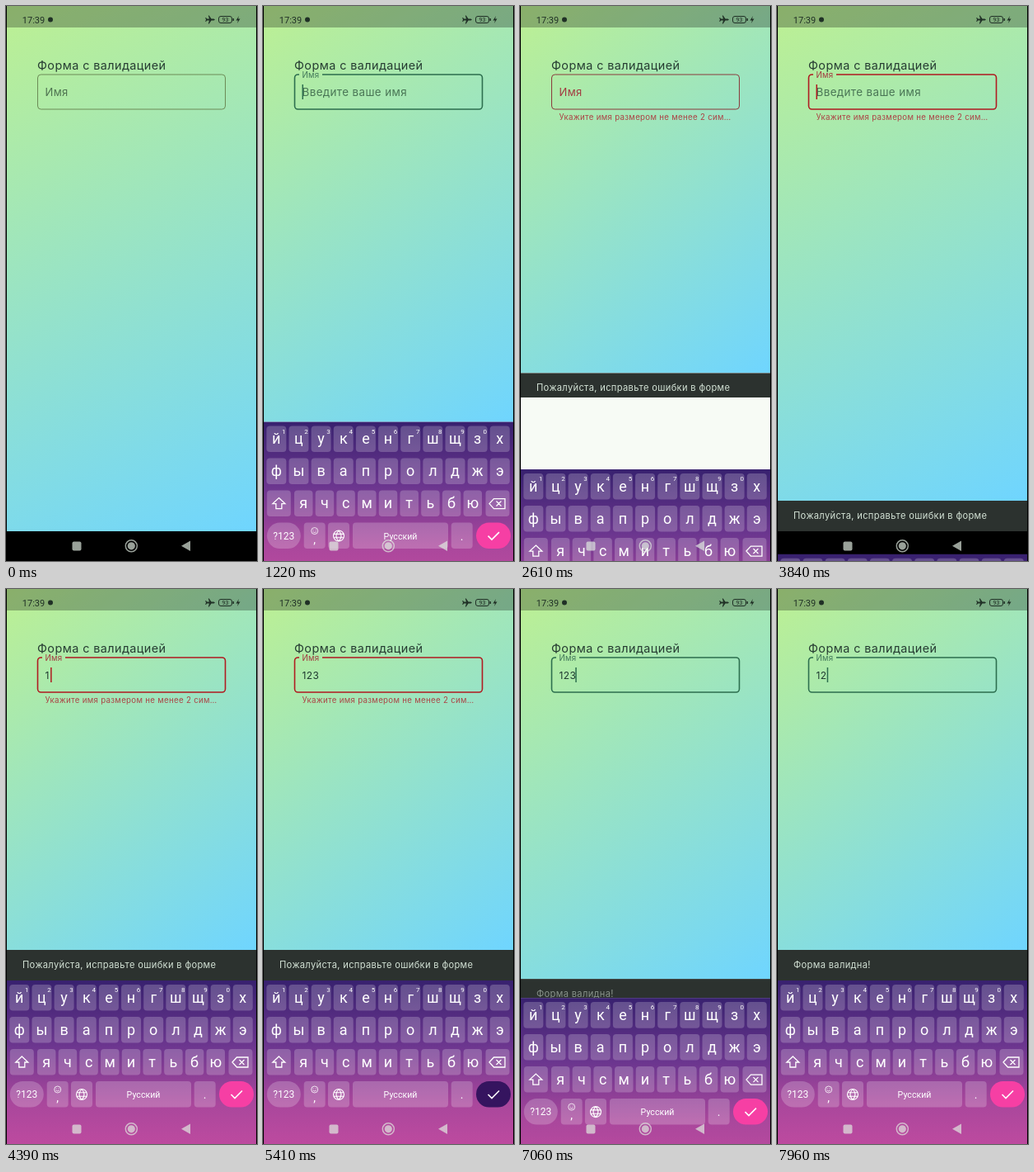
Write an HTML page with a canvas that moves like this. It is 305 px wide and 672 px high and loops after 8000 ms.

```html
<!DOCTYPE html>
<html lang="ru">
<head>
<meta charset="utf-8">
<style>
html, body { margin: 0; width: 100%; height: 100%; overflow: hidden; background: #000; }
canvas { display: block; }
</style>
</head>
<body>
<canvas id="stage" width="305" height="672"></canvas>
<script>
const ctx = document.getElementById('stage').getContext('2d');
const LOOP = 8000, W = 305, H = 672, NAV = 636, KEYS_TOP = 474, SNACK = 37;
const FORM = 'Inter, "Open Sans", sans-serif', SYSTEM = 'Roboto, sans-serif';

const clamp = v => Math.max(0, Math.min(1, v));
const mix = (a, b, p) => a + (b - a) * p;
const ramp = (t, start, len) => clamp((t - start) / len);

// cubic-bezier(.4, 0, .2, 1)
function ease(x) {
  let lo = 0, hi = 1;
  for (let i = 0; i < 20; i++) {
    const u = (lo + hi) / 2, v = 1 - u;
    if (1.2 * v * v * u + .6 * v * u * u + u ** 3 < x) lo = u; else hi = u;
  }
  return 3 * lo * lo - 2 * lo ** 3;
}
const move = (t, start, len) => ease(ramp(t, start, len));

// Timeline
const FOCUS = [[735, 2430], [3490, 5695], [6560, LOOP]];
const SHOW = [1050, 3804, 6874];
const HIDE = [2513, 5713];
const EDITS = [[4390, '1'], [4590, '12'], [4850, '123'], [7890, '12']];
const PRESSES = [[2200, 2400], [5400, 5600]];

// 1 while inside an interval, with a ramp at both ends
const within = (t, spans, lag, len) =>
  spans.reduce((s, [a, b]) => s + ramp(t, a + lag, len) - ramp(t, b, len), 0);

function sceneAt(t) {
  const up = SHOW.reduce((s, a) => s + move(t, a, 300), 0);
  const down = HIDE.reduce((s, a) => s + move(t, a, 300), 0);
  const keysTop = mix(H, KEYS_TOP, up - down);
  // the page keeps its size for a moment while the keyboard leaves
  const held = HIDE.some(a => t >= a && t < a + 145);
  const leaving = HIDE.some(a => t >= a + 145 && t < a + 300);
  const body = held ? KEYS_TOP : leaving ? NAV : Math.min(NAV, keysTop);
  const snack = move(t, 2480, 250) - move(t, 6700, 250) + move(t, 6960, 250);
  const edit = EDITS.filter(e => e[0] <= t).pop();
  const span = FOCUS.find(([a, b]) => t >= a && t < b);
  const blinkFrom = span && Math.max(span[0] + 80, edit ? edit[0] : 0);
  return {
    keysTop, body, snack,
    text: edit ? edit[1] : '',
    focused: !!span,
    cursor: span && Math.floor((t - blinkFrom) / 500) % 2 < 1,
    border: within(t, FOCUS, 40, 140),
    float: ease(clamp(within(t, [[735, 2430], [3490, LOOP]], 0, 165))),
    error: within(t, [[2420, 5695]], 0, 150),
    message: t < 6955 ? 'Пожалуйста, исправьте ошибки в форме' : 'Форма валидна!',
    pressed: PRESSES.some(([a, b]) => t >= a && t < b)
  };
}

// Drawing helpers
function rect(x, y, w, h, fill) {
  ctx.fillStyle = fill;
  ctx.fillRect(x, y, w, h);
}
function round(x, y, w, h, r, fill) {
  ctx.beginPath();
  ctx.roundRect(x, y, w, h, r);
  ctx.fillStyle = fill;
  ctx.fill();
}
function disc(x, y, r, fill) {
  ctx.beginPath();
  ctx.arc(x, y, r, 0, 7);
  ctx.fillStyle = fill;
  ctx.fill();
}
function line(d, x, y, color, width = 1.3) {
  ctx.save();
  ctx.translate(x, y);
  ctx.strokeStyle = color;
  ctx.lineWidth = width;
  ctx.stroke(new Path2D(d));
  ctx.restore();
}
function formText(s, x, y, size, fill) {
  ctx.font = size + 'px ' + FORM;
  ctx.letterSpacing = size * .03 + 'px';
  ctx.textAlign = 'left';
  ctx.fillStyle = fill;
  ctx.fillText(s, x, y);
  ctx.letterSpacing = '0px';
}
function keyText(s, x, y, size, fill = '#fff') {
  ctx.font = size + 'px ' + SYSTEM;
  ctx.textAlign = 'center';
  ctx.fillStyle = fill;
  ctx.fillText(s, x, y);
}

function drawStatus() {
  rect(0, 0, W, 26, 'rgba(0,0,0,.27)');
  const ink = '#203026';
  keyText('17:39', 33.5, 20.5, 11, ink);
  disc(54, 16.5, 3, ink);
  ctx.fill(new Path2D('M254 16.5L252.5 15.6H249.5L246.8 11.5H245.8L247 15.6H244.2L243 14H242.2L243 16.5' +
    'L242.2 19H243L244.2 17.4H247L245.8 21.5H246.8L249.5 17.4H252.5Z'));
  ctx.beginPath();
  ctx.roundRect(258.5, 12.5, 16, 8, 2.5);
  ctx.strokeStyle = ink;
  ctx.lineWidth = 1;
  ctx.stroke();
  rect(275.5, 15, 1.5, 3, ink);
  keyText('93', 266.5, 19.2, 7, ink);
  ctx.fill(new Path2D('M283 12L279.5 17.5H282L281 21L284.5 15.5H282Z'));
}

function drawField(s) {
  formText('Форма с валидацией', 38, 77, 14.4, '#263c32');
  const bad = s.error > .5;
  const edge = bad ? (s.focused ? '#b01a20' : '#8a3a3c') : s.focused ? '#2c6e4e' : '#6c8b56';
  const label = bad ? '#a23a40' : s.focused ? '#42785a' : '#4e7250';

  ctx.save();
  ctx.beginPath();
  ctx.rect(30, 70, 245, 65);
  if (s.float > 0) ctx.rect(58 - 14 * s.float, 78, 28 * s.float, 10);
  ctx.clip('evenodd');
  ctx.beginPath();
  ctx.roundRect(38.5, 83, 228, 42, 4);
  ctx.strokeStyle = edge;
  ctx.lineWidth = 1 + .6 * s.border;
  ctx.stroke();
  ctx.restore();

  formText('Имя', 47.5, mix(109, 87, s.float), mix(13, 9.7, s.float), label);
  if (s.text) {
    formText(s.text, 47.5, 109, 12, '#1f3a30');
  } else {
    ctx.globalAlpha = s.focused ? s.float : 0;
    formText('Введите ваше имя', 47.5, 109, 13.4, '#4a7656');
    ctx.globalAlpha = 1;
  }
  if (s.cursor) {
    const x = s.text ? 47.5 + 6.6 * s.text.length : 47.5;
    rect(x, 95, 1.5, 18, bad ? '#b01a20' : '#2c6e4e');
  }
  ctx.globalAlpha = s.error;
  formText('Укажите имя размером не менее 2 сим…', 47.5, 138, 9.73, '#ac4446');
  ctx.globalAlpha = 1;
}

function drawPage(s) {
  const end = s.body - SNACK * s.snack;
  // corner-to-corner shading of the current page height
  const g = ctx.createLinearGradient(0, 0, W, end);
  g.addColorStop(0, '#bdf092');
  g.addColorStop(1, '#6fd5ff');
  rect(0, 0, W, NAV, '#f7fbf5');
  rect(0, 0, W, end, g);
  drawStatus();
  drawField(s);
  if (s.snack > 0) {
    ctx.save();
    ctx.beginPath();
    ctx.rect(0, end, W, s.body - end);
    ctx.clip();
    rect(0, end, W, SNACK, '#2c322f');
    ctx.globalAlpha = clamp((s.snack - .4) / .4);
    formText(s.message, 20, end + 22, 11.15, '#d3e2d5');
    ctx.restore();
  }
}

function drawKeys(top, pressed) {
  const g = ctx.createLinearGradient(0, top, 0, top + 198);
  g.addColorStop(0, '#38216f');
  g.addColorStop(.4, '#6c368f');
  g.addColorStop(.75, '#a9479c');
  g.addColorStop(1, '#bd4a9f');
  rect(0, top, W, 200, g);

  const key = (x, y, w, r = 4) => round(x - w / 2, top + y, w, 31.5, r, 'rgba(255,255,255,.21)');
  const row = (letters, x0, step, y, w) => [...letters].forEach((c, i) => {
    key(x0 + i * step, y, w);
    keyText(c, x0 + i * step, top + y + 21.5, 18);
  });
  row('йцукенгшщзх', 16.3, 27.15, 5, 24);
  [...'1234567890'].forEach((c, i) => keyText(c, 25.3 + i * 27.15, top + 14, 8));
  row('фывапролджэ', 16.3, 27.15, 44, 24);
  row('ячсмитьбю', 49.2, 25.7, 83, 22.5);

  key(19.3, 83, 29);
  line('M0 -7L7.5 0H3.5V6H-3.5V0H-7.5Z', 19.3, top + 99, '#fff');
  key(285, 83, 29);
  line('M-10 0L-4.5 -6H9V6H-4.5ZM-1.5 -3L4.5 3M4.5 -3L-1.5 3', 285, top + 99, '#fff');

  key(25.3, 122, 41, 15.7);
  keyText('?123', 25.3, top + 142, 12);
  key(62.7, 122, 26);
  line('M4 0A4 4 0 1 1 -4 0A4 4 0 1 1 4 0M-2 1Q0 3 2 1M-1.5 -1.5V-.6M1.5 -1.5V-.6',
    62.7, top + 132, '#fff', .8);
  keyText(',', 62.7, top + 147, 14);
  key(92, 122, 26);
  line('M6.5 0A6.5 6.5 0 1 1 -6.5 0A6.5 6.5 0 1 1 6.5 0M0 -6.5Q-6 0 0 6.5Q6 0 0 -6.5M-6 -2.2H6M-6 2.2H6',
    92, top + 138, '#fff', 1.1);
  key(167, 122, 116);
  keyText('Русский', 167, top + 142, 10.6);
  key(241.7, 122, 26);
  keyText('.', 241.7, top + 143, 14);
  round(259, top + 122, 42, 31.5, 15.7, pressed ? '#35145f' : '#f63fa4');
  line('M-6.5 0L-2 4.5L7 -4.5', 280, top + 138, '#fff', 1.6);
}

function drawNav() {
  const ink = 'rgba(225,238,225,.68)';
  round(80.5, 648.5, 11, 11, 2, ink);
  disc(152.3, 653.8, 4.6, ink);
  line('M7 0A7 7 0 1 1 -7 0A7 7 0 1 1 7 0', 152.3, 653.8, ink, 1.5);
  ctx.fillStyle = ink;
  ctx.fill(new Path2D('M213 653.8L224 647.5V660Z'));
}

function frame(now) {
  const s = sceneAt(now % LOOP);
  rect(0, 0, W, H, '#000');
  drawPage(s);
  rect(0, NAV, W, H - NAV, '#000');
  if (s.keysTop < H) drawKeys(s.keysTop, s.pressed);
  drawNav();
  rect(0, 0, 1, H, '#000');
  rect(W - 1, 0, 1, H, '#000');
  requestAnimationFrame(frame);
}
requestAnimationFrame(frame);
</script>
</body>
</html>
```
